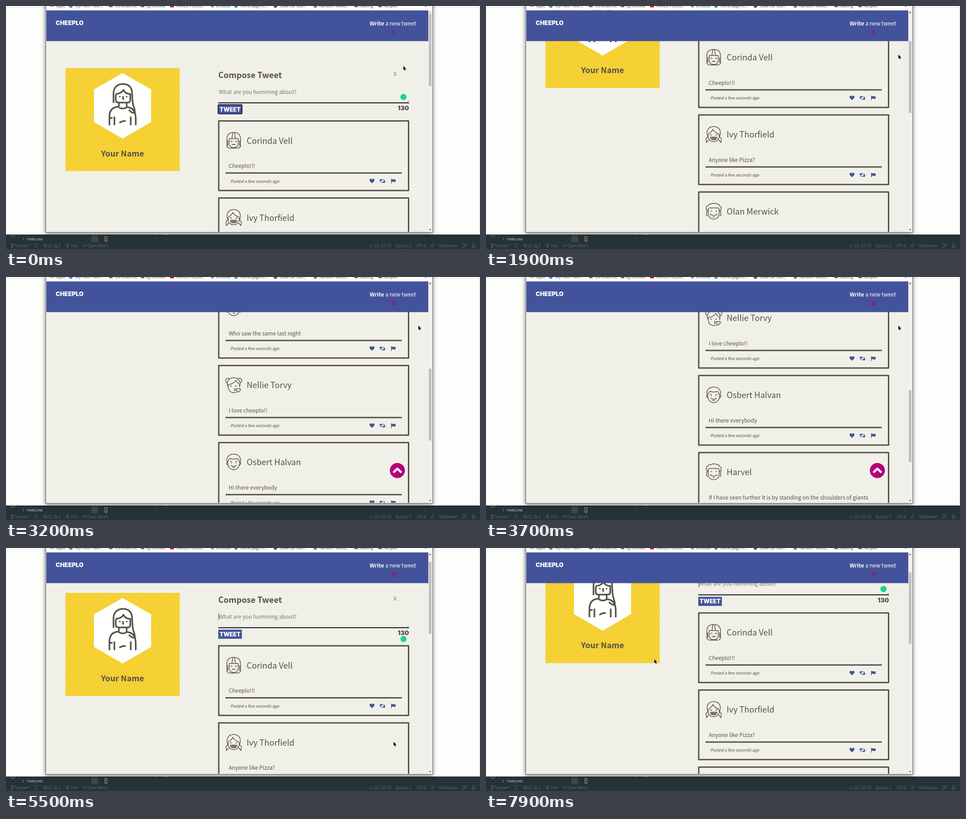
Write an HTML page with a canvas that moves like this. It is 1045 px wide and 536 px high and loops after 8 s.

```html
<!DOCTYPE html>
<html lang="en">
<head>
<meta charset="utf-8">
<title>Cheeplo</title>
<style>
html, body { margin: 0; width: 100%; height: 100%; overflow: hidden; background: #fdfdfc; }
canvas { display: block; width: 1045px; height: 536px; }
</style>
</head>
<body>
<canvas id="stage"></canvas>
<script>
const W = 1045, H = 536, LOOP = 8000;
const canvas = document.getElementById('stage');
const ctx = canvas.getContext('2d');
const dpr = window.devicePixelRatio || 1;
canvas.width = W * dpr;
canvas.height = H * dpr;

const SANS = '"Noto Sans CJK JP", "Noto Sans CJK SC", "Noto Sans", sans-serif';
const HEAVY = 'Inter, "Noto Sans", sans-serif';
const UI = '"Open Sans", "Noto Sans", sans-serif';
const INK = '#545149', BLUE = '#43539b', PAPER = '#f1f0e8', PINK = '#b3007b', RED = '#ec2439';

const MAX_SCROLL = 968, CLICK = 4977, RISE = 600;
const scrollKeys = [[0, 0], [1150, 0], [1400, 42], [1900, 183], [2700, 420], [3700, 716], [4550, MAX_SCROLL], [CLICK, MAX_SCROLL]];
const cursorKeys = [
  [0, 876, 132], [150, 876, 132], [800, 909, 107], [4500, 909, 107], [4850, 855, 428],
  [5300, 855, 428], [6000, 852, 424], [6500, 852, 424], [6650, 855, 36], [6720, 886, 19],
  [6950, 400, 300], [7050, 250, 486], [7160, 46, 380], [7300, 107, 330], [7520, 260, 262], [7850, 371, 245], [8000, 371, 245]
];

const cards = [
  ['Corinda Vell', 'Cheeplo!!!', 'bob'],
  ['Ivy Thorfield', 'Anyone like Pizza?', 'pigtails'],
  ['Olan Merwick', 'Who saw the same last night', 'curly'],
  ['Nellie Torvy', 'I love cheeplo!!', 'buns'],
  ['Osbert Halvan', 'Hi there everybody', 'short'],
  ['Harvel', 'If I have seen further it is by standing on the shoulders of giants', 'curly', '4 years'],
  ['Montrelle', 'Je pense , donc je suis', 'bob', '4 years']
];

// Line drawings centred on 0,0
const faces = {
  bob: 'M-15 14V-3C-15-13-9-17.5 0-17.5S15-13 15-3V14L10 17H-10ZM-10-4V6C-10 13-5 16 0 16S10 13 10 6V-4ZM-4-4L-2-17M4-4L2-17' +
    'M-13 0V12M13 0V12M-7 3Q-5 0-3 3M3 3Q5 0 7 3M-4 8Q-2 11 0 8Q2 11 4 8',
  pigtails: 'M-13 5C-18-9-11-17.5 0-17.5S18-9 13 5M-12-1C-8-3-4-6-2-11C2-5 7-2 12-1M-12 0C-14 11-7 16 0 16S14 11 12 0' +
    'M-13 5L-17 9L-16 18L-11 12M13 5L17 9L16 18L11 12M-8 2Q-6-1-4 2M4 2Q6-1 8 2M-7 6H7Q7 12 0 12T-7 6ZM-3 6V11M0 6V12M3 6V11M-7 9H7',
  curly: 'M-13-2Q-18-3-16-8Q-17-13-12-13Q-10-18-6-16Q-3-20 0-17Q4-20 7-16Q12-17 13-12Q18-11 16-6Q18-2 13-2' +
    'M-12-6Q-8-10-4-7Q0-10 4-7Q8-10 12-6V4C12 13 6 17 0 17S-12 13-12 4ZM-12-2Q-17-1-15 4Q-18 8-13 10M12-2Q17-1 15 4Q18 8 13 10' +
    'M-7-1H-4M4-1H7M-7 6Q0 12 7 6M-7 5V8M7 5V8M-2 12H2',
  buns: 'M-9-13A5 5 0 1 0-14-5M9-13A5 5 0 1 1 14-5M-13 3C-17-8-9-16 0-16S17-8 13 3M-12-1Q0-2 5-10Q8-4 12-2' +
    'M-12-1V4C-12 12-6 17 0 17Q4 17 7 15M13-2V5M-8 2L-4 3M3 3L7 2M1 7Q4 8 2 10Q4 11 1 13M10 16L5 11Q5 6 10 9Q15 6 15 11Z',
  short: 'M-14 2C-18-11-10-17.5 0-17.5S18-11 14 2M-13 1C-12-3-11-7-8-8Q0-5 8-8C11-7 12-3 13 1M-13 0Q-17 0-15 5Q-14 7-12 6' +
    'M13 0Q17 0 15 5Q14 7 12 6M-13 2C-13 12-6 17 0 17S13 12 13 2M-8-2L-4-1M4-1L8-2M-6 2H-4M4 2H6M-7 7Q0 12 7 7M-3 12H3'
};
for (const name in faces) faces[name] = new Path2D(faces[name]);

const hero = new Path2D(
  'M237 214V193C237 179 246 172 258 172S278 179 278 193L279 211C280 223 285 226 284 236Q276 236 271 229' +
  'M242 195V207Q242 213 248 213H268Q274 213 274 207V194Q263 194 259 185Q255 193 242 194' +
  'M249 214V221M266 214V222M228 263V247H235M228 247Q227 224 247 222Q257 230 267 223Q286 225 286 248V263' +
  'M239 244V263M275 244V263M250 258Q256 253 264 254M258 199V205H260');
const heart = new Path2D('M0 5L-5 0C-7-4-2-7 0-3C2-7 7-4 5 0Z');
const repost = new Path2D('M-4 3V-3H2M4-3V3H-2M-6.5-.5L-4-3.5L-1.5-.5M6.5.5L4 3.5L1.5.5');
const flag = new Path2D('M-5-5V5.5H-3.7V2C-1 .5 1 3.5 5 1.5V-4C1-2-1-5-3.7-3.6V-5Z');
const pointer = new Path2D('M0 0V9.5L2.2 7.5L3.7 11L5.3 10.3L3.8 7H6.8Z');

function track(keys, t, ease = p => p) {
  let i = 0;
  while (i < keys.length - 2 && t >= keys[i + 1][0]) i++;
  const [a, b] = [keys[i], keys[i + 1]];
  const p = ease(Math.min(1, (t - a[0]) / (b[0] - a[0])));
  return a.slice(1).map((v, k) => v + (b[k + 1] - v) * p);
}
const swing = p => 0.5 - Math.cos(p * Math.PI) / 2;

function scrollAt(t) {
  if (t < CLICK) return track(scrollKeys, t)[0];
  if (t < CLICK + RISE) return MAX_SCROLL * (1 - swing((t - CLICK) / RISE));
  return Math.max(0, t - 7500) * 0.275;
}

function rect(x, y, w, h, color) {
  ctx.fillStyle = color;
  ctx.fillRect(x, y, w, h);
}
function text(s, x, y, font, color, align = 'left') {
  ctx.font = font;
  ctx.fillStyle = color;
  ctx.textAlign = align;
  ctx.fillText(s, x, y);
}
function line(points, color, width, close) {
  ctx.beginPath();
  points.forEach(([x, y]) => ctx.lineTo(x, y));
  if (close) ctx.closePath();
  ctx.strokeStyle = color;
  ctx.lineWidth = width;
  ctx.stroke();
}
function poly(points, color) {
  ctx.beginPath();
  points.forEach(([x, y]) => ctx.lineTo(x, y));
  ctx.fillStyle = color;
  ctx.fill();
}
function disc(x, y, r, color) {
  ctx.beginPath();
  ctx.arc(x, y, r, 0, 7);
  ctx.fillStyle = color;
  ctx.fill();
}
function ring(x, y, r, color, from = 0, to = 7) {
  ctx.beginPath();
  ctx.arc(x, y, r, from, to);
  ctx.strokeStyle = color;
  ctx.lineWidth = 1;
  ctx.stroke();
}
function at(x, y, draw) {
  ctx.save();
  ctx.translate(x, y);
  draw();
  ctx.restore();
}

function drawEditor() {
  const dim = '#5c6f77', font = '8.2px ' + UI;
  rect(0, 503.5, W, 33, '#263238');
  ring(15, 503, 5, '#8a989e');
  line([[37, 511], [40, 514], [37, 517]], '#8a989e', 1);
  text('TIMELINE', 45.5, 517, 'bold 7.6px ' + UI, '#8fa0a7');
  rect(188, 505, 15, 16, '#3a464c');
  ctx.strokeStyle = '#d9b13b';
  ctx.lineWidth = 1;
  ctx.strokeRect(218, 508.5, 4.5, 10.5);
  rect(331, 503.5, 3, 2, dim);
  rect(346, 503.5, 11, 1.5, dim);
  const labels = [['master*', 21], ['32', 92], ['3', 115], ['Orin', 142], ['Open Bench', 179], ['Ln 24, Col 55', 801],
    ['Spaces: 2', 858], ['UTF-8', 904], ['LF', 936], ['Markdown', 955]];
  labels.forEach(([s, x]) => text(s, x, 531.5, font, dim));
  ring(13, 525, 1.3, dim); ring(13, 532, 1.3, dim); ring(18, 526, 1.3, dim);
  line([[13, 526], [13, 531], [17, 528]], dim, 1);
  ring(66, 528.5, 3.5, dim, 0.3, 2.7);
  ring(66, 528.5, 3.5, dim, 3.4, 5.9);
  ring(87, 528.5, 3.7, dim);
  line([[85.5, 527], [88.5, 530]], dim, 0.8);
  line([[88.5, 527], [85.5, 530]], dim, 0.8);
  line([[109, 525], [113, 532], [105, 532]], dim, 1, true);
  ring(135.5, 526, 1.6, dim);
  line([[133.5, 529], [135.5, 533], [137.5, 529]], dim, 1, true);
  line([[169, 532], [170, 528], [173, 527], [173, 525], [176, 528], [173, 531]], dim, 1);
  line([[1006, 525], [1014, 525], [1014, 530], [1010, 530], [1007, 533], [1007, 530]], dim, 1);
  line([[1027, 531], [1028, 529], [1028, 526], [1031, 524], [1034, 526], [1034, 529], [1035, 531]], dim, 1, true);
  rect(1030, 532, 2, 1, dim);
}

function drawWindow() {
  rect(0, 0, W, 504, '#fdfdfc');
  rect(0, 2.5, W, 1, '#e3e3e2');
  rect(1043.5, 0, 1, 503, '#cfd0d0');
  ctx.save();
  ctx.shadowColor = 'rgba(0,0,0,.55)';
  ctx.shadowBlur = 9 * dpr;
  ctx.shadowOffsetY = 2 * dpr;
  rect(87, -20, 854, 520, '#77787a');
  ctx.restore();
  rect(88.3, 0, 851.5, 498.6, '#fefefd');
  const marks = [['Apps', 110], ['My Files - Wor...', 153], ['Coronavirus', 240], ['lighthouse', 309], ['HARLO Purple...', 375],
    ['Untitled', 463], ['home page o....', 516], ['Scale Ear Les...', 603], ['Random Webs...', 691], ['Reading', 778], ['Recipes', 832]];
  marks.forEach(([s, x]) => text(s, x, 2.6, '8.5px ' + UI, '#4b4e52'));
  text('»', 923, 2.6, '9px ' + UI, '#4b4e52');
  [227, 297, 768, 821].forEach(x => rect(x, -3, 8, 5.5, '#606367'));
  rect(362, -3, 8, 6, '#c4112f');
  disc(143, 0, 4, '#4a86d8');
  disc(455, 0, 3.6, '#7e9bd2');
  disc(507, 0, 4, '#3f98b8');
  disc(594, 0, 4, '#55585c');
  disc(682, 0, 4, '#7c8084');
  [97, 100, 103].forEach((x, i) => rect(x, 0, 2, 2, ['#d85b48', '#e2b43b', '#4c9a5c'][i]));
}

function drawProfile() {
  ctx.save();
  ctx.beginPath();
  ctx.rect(131, 137, 252, 227);
  ctx.clip();
  rect(131, 137, 252, 227, '#f8d335');
  for (let row = 0; row < 24; row++) {
    for (let col = 0; col < 8; col++) {
      const x = 131 + col * 42 + (row % 2) * 21, y = 137 + row * 10.5;
      disc(x, y, 21, '#f7d336');
      for (let r = 20; r > 4; r -= 5) ring(x, y, r, '#edc72f', Math.PI, Math.PI * 2);
    }
  }
  ctx.restore();
  poly([[257, 148], [320, 184], [320, 256], [257, 292.5], [194, 256], [194, 184]], '#fffffd');
  ctx.strokeStyle = INK;
  ctx.lineWidth = 3.5;
  ctx.stroke(hero);
  disc(251, 200, 1.8, INK);
  disc(266, 200, 1.8, INK);
  text('Your Name', 257, 331.5, '600 17.8px ' + SANS, INK, 'center');
}

function drawCompose(t) {
  text('Compose Tweet', 468, 159, '600 17.9px ' + SANS, INK);
  text('X', 857.5, 154, '600 12px ' + SANS, '#a2a19d', 'center');
  text('What are you humming about?', 469, 193.5, '12.05px ' + SANS, '#77766f');
  if (t > 5000 && (t - 450) % 1000 < 500) rect(468.5, 181, 1, 16, '#33312d');
  line([[884, 212], [888, 208]], '#8b8a86', 0.8);
  line([[886.5, 212], [888, 210.5]], '#8b8a86', 0.8);
  rect(468, 212.6, 420.5, 2, '#0c0c0c');
  rect(468, 218, 52, 20, BLUE);
  if (t < CLICK) {
    ctx.beginPath();
    ctx.roundRect(467.5, 217.5, 53, 20.5, 2);
    ctx.strokeStyle = '#111526';
    ctx.lineWidth = 1.6;
    ctx.stroke();
  }
  text('TWEET', 494, 232.7, '900 12.6px ' + HEAVY, '#fff', 'center');
  text('130', 888.5, 230, '900 13.6px ' + HEAVY, INK, 'right');
}

function drawCard([name, message, face, age = 'a few seconds'], y) {
  ctx.strokeStyle = INK;
  ctx.lineWidth = 3;
  ctx.strokeRect(469, y + 1.5, 418.5, 153.5);
  at(502, y + 44.5, () => {
    ctx.lineWidth = 1.5;
    ctx.stroke(faces[face]);
  });
  text(name, 530.5, y + 51.7, '18.1px ' + SANS, INK);
  text(message, 491, y + 105.3, '12.05px ' + SANS, INK);
  rect(484, y + 114.8, 388.5, 3, INK);
  text(`Posted ${age} ago`, 494.5, y + 137.5, 'italic 9.1px ' + SANS, INK);
  ctx.fillStyle = ctx.strokeStyle = BLUE;
  ctx.lineWidth = 1.6;
  at(807, y + 134, () => ctx.fill(heart));
  at(830, y + 134, () => ctx.stroke(repost));
  at(854, y + 134, () => ctx.fill(flag));
}

function drawHeader(t) {
  rect(89, 9.5, 842, 68, BLUE);
  text('CHEEPLO', 109.5, 42, '900 13.1px ' + HEAVY, '#fff');
  text(' a new tweet', 904, 43, '12.05px ' + SANS, '#fff', 'right');
  const x = 904 - ctx.measureText(' a new tweet').width;
  text('Write', x, 43, 'bold 12.05px ' + SANS, '#fff', 'right');
  const wave = Math.cos((t / 1000 - 0.05) * Math.PI * 2);
  const y = 57.3 - wave * 0.9;
  ctx.globalAlpha = 0.84 - wave * 0.16;
  [-4, 1].forEach(d => line([[850, y + d], [854.3, y + d + 3.8], [858.6, y + d]], PINK, 2.2));
  ctx.globalAlpha = 1;
}

function drawScrollbar(scroll) {
  rect(931, 9.5, 8.5, 489, '#f1f1f0');
  rect(932, 18 + scroll * 0.324, 6, 158.5, '#c1c1c1');
  poly([[932.5, 15.5], [935, 12.5], [937.5, 15.5]], scroll > 0 ? '#505050' : '#a3a3a3');
  poly([[932.5, 492], [935, 495], [937.5, 492]], scroll < MAX_SCROLL ? '#505050' : '#a3a3a3');
}

function draw(t) {
  const scroll = scrollAt(t);
  const [cx, cy] = track(cursorKeys, t, swing);
  ctx.setTransform(dpr, 0, 0, dpr, 0, 0);
  ctx.lineJoin = 'round';
  drawEditor();
  drawWindow();

  ctx.save();
  ctx.beginPath();
  ctx.rect(89, 9.5, 842, 488.5);
  ctx.clip();
  rect(89, 9.5, 842, 489, PAPER);
  at(0, -scroll, () => {
    if (scroll < 300) {
      drawProfile();
      drawCompose(t);
    }
    cards.forEach((card, i) => {
      const y = 252 + i * 170;
      if (y - scroll < 500 && y - scroll > -100) drawCard(card, y);
    });
  });
  const rising = t >= CLICK && t < CLICK + RISE;
  disc(876.3, 200.7 - (rising ? 0 : scroll), 6.8, '#19d196');
  if (scroll > 300) {
    const hover = Math.hypot(cx - 863, cy - 427) < 16.5;
    disc(862.8, 426.8, 16.6, hover ? RED : PINK);
    line([[854, 431.3], [862.8, 422.7], [871.6, 431.3]], '#fff', 4.6);
  }
  drawHeader(t);
  ctx.restore();

  drawScrollbar(scroll);
  at(cx, cy, () => {
    ctx.strokeStyle = '#fff';
    ctx.lineWidth = 1.4;
    ctx.stroke(pointer);
    ctx.fillStyle = '#161616';
    ctx.fill(pointer);
  });
}

const start = performance.now();
function tick() {
  draw((performance.now() - start) % LOOP);
  requestAnimationFrame(tick);
}
tick();
</script>
</body>
</html>
```
